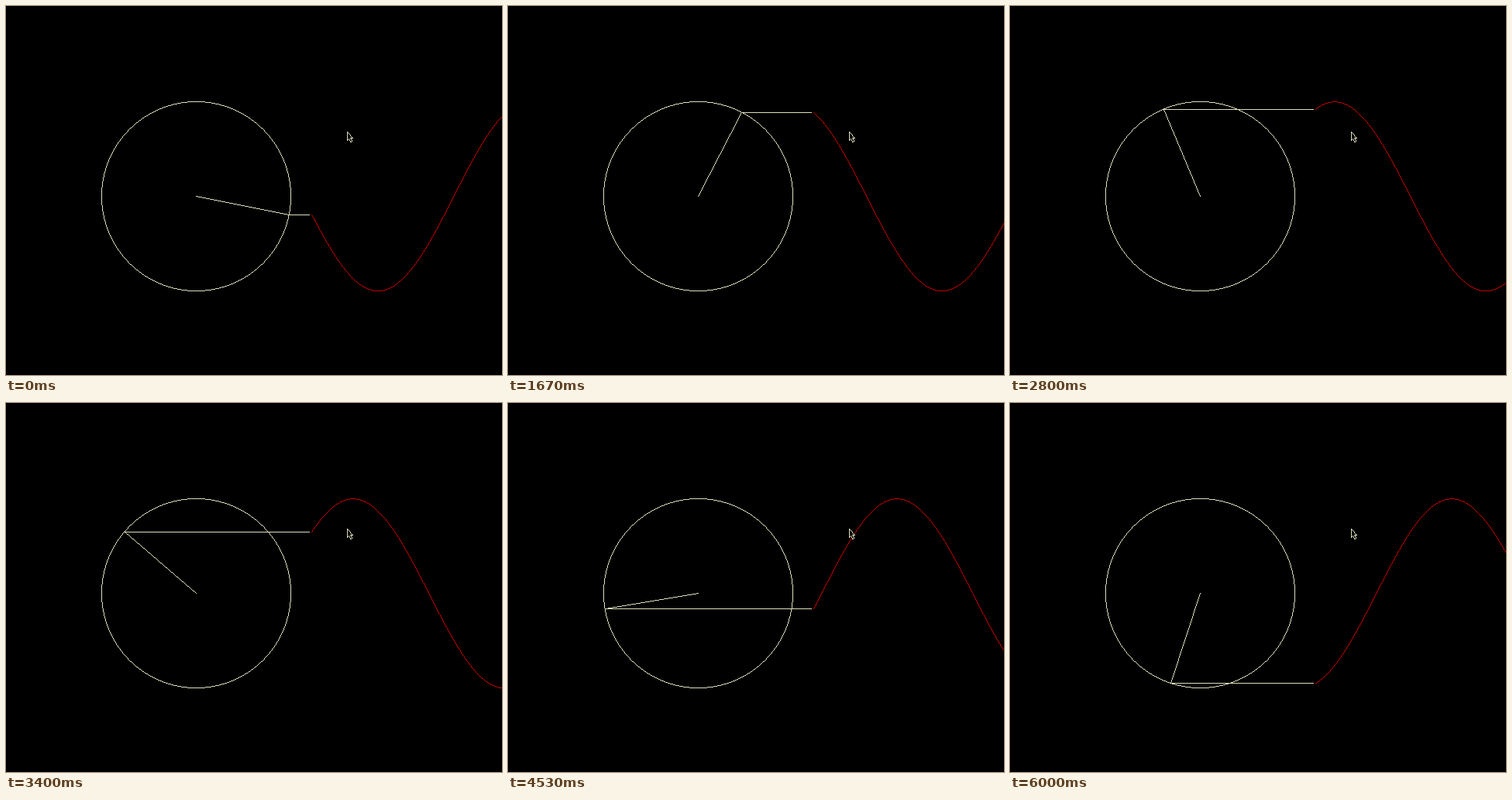
An HTML page with a canvas for the animation above (6.07 s loop, 640 by 476 pixels).

```html
<!DOCTYPE html>
<html lang="en">
<head>
<meta charset="utf-8">
<title>Sine wave from a rotating radius</title>
<style>
  html, body { margin: 0; width: 100%; height: 100%; overflow: hidden; background: #000; }
  canvas { display: block; }
</style>
</head>
<body>
<canvas id="stage" width="640" height="476"></canvas>
<script>
const ctx = document.getElementById('stage').getContext('2d');
const LOOP = 6070;
const PALE = '#dedebe', RED = '#c40000';
const CENTER = 245, RADIUS = 122;
const WAVE_X = 394, PERIOD = 390, START = -12;
const STEP = 2 * Math.PI / PERIOD;

// [tick, pixels scrolled]
const scroll = [[0, 0], [11, 34], [25, 80], [42, 134], [59, 188], [77, 246], [90, 285]];
const arrow = [[440, 162], [440, 173], [442, 171], [444, 175], [446, 174], [444, 170], [447, 170]];

const dot = (x, y) => ctx.fillRect(x, y, 1, 1);

// Aliased one-pixel line
function line(x0, y0, x1, y1) {
  const n = Math.max(Math.abs(x1 - x0), Math.abs(y1 - y0), 1);
  for (let i = 0; i <= n; i++) {
    dot(Math.round(x0 + (x1 - x0) * i / n), Math.round(y0 + (y1 - y0) * i / n));
  }
}

function circle(c, r) {
  for (let a = 0; a <= r * Math.SQRT1_2 + 0.5; a++) {
    const b = Math.round(Math.sqrt(r * r - a * a));
    for (const [x, y] of [[a, b], [b, a]]) {
      dot(c + x, c + y);
      dot(c - x, c + y);
      dot(c + x, c - y);
      dot(c - x, c - y);
    }
  }
}

function pointer() {
  ctx.fillStyle = '#000';
  ctx.beginPath();
  arrow.forEach(([x, y]) => ctx.lineTo(x + 0.5, y + 0.5));
  ctx.fill();
  ctx.fillStyle = PALE;
  arrow.forEach((p, i) => line(...p, ...arrow[(i + 1) % arrow.length]));
}

// Ticks run at 15 per second, rounded to 10 ms
function tickAt(t) {
  const k = Math.round(t * 0.015);
  return Math.round(k * 20 / 3) * 10 > t ? k - 1 : k;
}

function offsetAt(tick) {
  const i = Math.max(1, scroll.findIndex(([k]) => k >= tick));
  const [k0, s0] = scroll[i - 1], [k1, s1] = scroll[i];
  return Math.round(s0 + (s1 - s0) * (tick - k0) / (k1 - k0));
}

const height = a => Math.round(CENTER + 0.2 - RADIUS * Math.sin(a));

function wave(phase) {
  const y = i => height((phase - i) * STEP);
  for (let i = 0; WAVE_X + i < 640; i++) line(WAVE_X + i, y(i), WAVE_X + i + 1, y(i + 1));
}

function draw(t) {
  const phase = START + offsetAt(tickAt(t));
  const angle = phase * STEP;
  const x = Math.round(CENTER + 0.2 + RADIUS * Math.cos(angle));
  const y = height(angle);

  ctx.fillStyle = '#000';
  ctx.fillRect(0, 0, 640, 476);

  ctx.fillStyle = RED;
  wave(phase);

  ctx.fillStyle = PALE;
  circle(CENTER, RADIUS);
  line(CENTER, CENTER, x, y);
  line(x, y, 391, y);

  pointer();
}

const begin = performance.now();
function frame() {
  draw((performance.now() - begin) % LOOP);
  requestAnimationFrame(frame);
}
frame();
</script>
</body>
</html>
```
